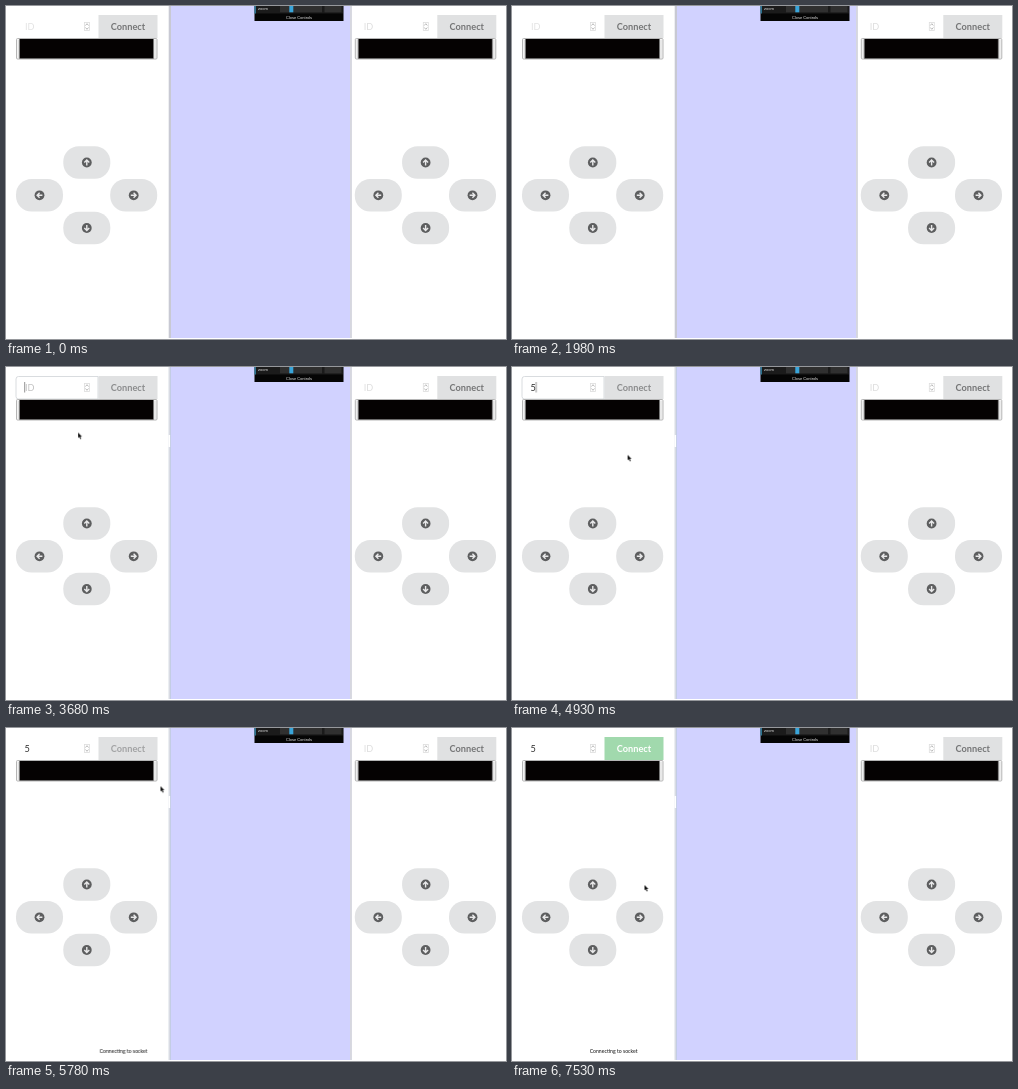
Write an HTML page that moves like this. It is 500 px wide and 333 px high and loops after 8 s.

```html
<!DOCTYPE html>
<html lang="en">
<head>
<meta charset="utf-8">
<title>Controller</title>
<style>
html, body { margin: 0; width: 100%; height: 100%; overflow: hidden; background: #fff; }
svg { display: block; width: 500px; height: 333px; }
text { font-family: Lato, sans-serif; }
.label { font-size: 9.2px; font-weight: 700; fill: #747576; text-anchor: middle; }
.field { font-size: 9.2px; fill: #dedede; }
.panel { font: 4px "Liberation Sans", Arial, sans-serif; fill: #eee; }
.toast { font-size: 5.15px; fill: #111; }
.key { fill: #e2e3e4; }

/* one loop is 8 s: 1% = 80 ms */
.anim { animation: 8s linear infinite; }
.hard { animation-timing-function: step-end; }
#cursor { animation-name: cursor; }
#focus { animation-name: focus; }
#hint { animation-name: hint; }
#value { animation-name: value; }
#caret { animation-name: caret; }
#edge { animation-name: edge; }
#button { animation-name: button; }
#buttonText { animation-name: button-text; }
#toast { animation-name: toast; }

@keyframes cursor {
  0%, 14.1% { transform: translate(-9px, 132px); }
  16% { transform: translate(35px, 121px); }
  17.9%, 20.9% { transform: translate(72px, 110px); }
  22.8% { transform: translate(38px, 140px); }
  24.7% { transform: translate(-9px, 180px); }
  24.75%, 30.2% { transform: translate(-9px, 187px); }
  33% { transform: translate(70px, 148px); }
  35.5% { transform: translate(147px, 92px); }
  38% { transform: translate(112px, 55px); }
  40.4% { transform: translate(72px, 32px); }
  42%, 43.2% { transform: translate(50px, 21px); }
  46% { transform: translate(72px, 65.5px); }
  48.5% { transform: translate(88px, 82px); }
  51%, 60.8% { transform: translate(105.5px, 95.5px); }
  61.6% { transform: translate(115.5px, 88.5px); }
  65% { transform: translate(126px, 30px); }
  66%, 68.5% { transform: translate(128px, 22px); }
  71% { transform: translate(150px, 46px); }
  72.25% { transform: translate(154.5px, 58px); }
  74.5% { transform: translate(145px, 88px); }
  76.6%, 80.4% { transform: translate(134.5px, 110px); }
  85% { transform: translate(131px, 126px); }
  90.4% { transform: translate(132px, 152px); }
  94.1%, 100% { transform: translate(132.5px, 157px); }
}
@keyframes focus { 0% { opacity: 0; } 43% { opacity: 1; } 67.5%, 100% { opacity: 0; } }
@keyframes hint { 0% { fill: #e3e3e3; } 43% { fill: #c2c2c2; } 54%, 100% { fill: transparent; } }
@keyframes value { 0% { opacity: 0; } 54%, 100% { opacity: 1; } }
@keyframes caret {
  0% { opacity: 0; }
  43% { opacity: 1; transform: none; }
  54% { opacity: 1; transform: translateX(5.5px); }
  67.5%, 100% { opacity: 0; }
}
@keyframes edge { 0% { opacity: 0; } 43%, 100% { opacity: 1; } }
@keyframes button { 0%, 73% { fill: #e0e1e2; } 75%, 100% { fill: #a1d9ad; } }
@keyframes button-text {
  0%, 43% { fill: #747576; }
  44%, 67% { fill: #8b8c8d; }
  68%, 73% { fill: #a2a3a4; }
  75%, 100% { fill: #fff; }
}
@keyframes toast {
  0%, 70.5% { transform: translateX(90px); }
  72.25% { transform: translateX(16px); }
  73.5% { transform: translateX(-13px); }
  75% { transform: translateX(4px); }
  76% { transform: translateX(-2px); }
  76.6%, 100% { transform: none; }
}
</style>
</head>
<body>
<svg viewBox="0 0 500 333">
  <defs>
    <g id="key">
      <rect class="key" x="-23.5" y="-16.3" width="47" height="32.6" rx="15.5"/>
      <circle r="4.9" fill="#5d5e5f"/>
      <path d="M0 2.9V-2M-2.5 .1L0-2.4L2.5 .1" fill="none" stroke="#e9e9ea" stroke-width="1.4"/>
    </g>
    <g id="arrow">
      <circle r="4.9" fill="#5d5e5f"/>
      <path d="M0 2.9V-2M-2.5 .1L0-2.4L2.5 .1" fill="none" stroke="#e9e9ea" stroke-width="1.4"/>
    </g>
    <g id="pill">
      <rect class="key" x="-23.5" y="-16.3" width="47" height="32.6" rx="15.5"/>
    </g>
    <g id="pad">
      <rect x="10.5" y="32.5" width="140.5" height="20.5" rx="1" fill="#f4f4f4" stroke="#b5b5b5"/>
      <path d="M12.5 34V52M149 34V52" stroke="#ddd"/>
      <rect x="13.5" y="33" width="134" height="19.5" fill="#050202"/>
      <path d="M13.5 33V52.5M147.5 33V52.5" stroke="#777" stroke-width=".7"/>
      <g fill="none" stroke="#a8a8a8" stroke-width=".8">
        <rect x="78.5" y="16.5" width="5" height="8" stroke="#ddd"/>
        <path d="M79.5 19.5L81 17.7L82.5 19.5M79.5 21.5L81 23.3L82.5 21.5"/>
      </g>
      <use href="#key" x="80.8" y="156.5"/>
      <use href="#pill" x="33.5" y="189.3"/>
      <use href="#arrow" transform="translate(33.5 189.3) rotate(-90)"/>
      <use href="#pill" x="127.7" y="189.3"/>
      <use href="#arrow" transform="translate(127.7 189.3) rotate(90)"/>
      <use href="#pill" x="80.8" y="222"/>
      <use href="#arrow" transform="translate(80.8 222) rotate(180)"/>
    </g>
    <clipPath id="screen"><rect width="163" height="333"/></clipPath>
  </defs>

  <rect width="500" height="333" fill="#fff"/>

  <!-- viewer -->
  <rect x="162.7" width="183" height="332" fill="#c8c9d3"/>
  <rect x="165" width="179" height="332" fill="#d1d2ff"/>
  <path d="M344.7 0V332" stroke="#d9dae2"/>
  <g id="edge" class="anim hard">
    <path d="M163 0V332" stroke="#e9edf3"/>
    <path d="M164.5 0V332" stroke="#c3cde4"/>
    <path d="M163.3 68V80" stroke="#fff" stroke-width="1.6"/>
  </g>
  <rect x="248.5" width="89" height="15" fill="#050505"/>
  <rect x="249" width="88" height="7.5" fill="#1b1b1b"/>
  <rect x="248.5" width="1.4" height="7.5" fill="#2f7f9f"/>
  <rect x="274" width="42" height="6.3" fill="#303030"/>
  <rect x="283.3" width="4" height="6.3" fill="#39a5da"/>
  <rect x="318.5" width="17" height="6.3" fill="#303030"/>
  <text class="panel" x="252" y="4.2">zoom</text>
  <text class="panel" x="293" y="13" text-anchor="middle">Close Controls</text>

  <!-- left controller -->
  <rect id="button" class="anim" x="92.5" y="9" width="59" height="23" fill="#e0e1e2"/>
  <text id="buttonText" class="label anim" x="122" y="23.6">Connect</text>
  <path id="focus" class="anim hard" d="M92 9.5H12.5Q10 9.5 10 12V29.5Q10 32 12.5 32H92Z" fill="#fff" stroke="#d5d9dc" stroke-width=".9"/>
  <use href="#pad"/>
  <text id="hint" class="field anim hard" x="19" y="23.6">ID</text>
  <text id="value" class="field anim hard" x="18.4" y="23.6" style="fill:#333">5</text>
  <path id="caret" class="anim hard" d="M18.7 15V25.5" stroke="#777" stroke-width=".8"/>
  <g clip-path="url(#screen)">
    <text id="toast" class="toast anim" x="77.7" y="325">Connecting to socket</text>
  </g>

  <!-- right controller -->
  <g transform="translate(338.8)">
    <rect x="92.5" y="9" width="59" height="23" fill="#e0e1e2"/>
    <text class="label" x="122" y="23.6">Connect</text>
    <use href="#pad"/>
    <text class="field" x="19" y="23.6">ID</text>
  </g>

  <path id="cursor" class="anim" d="M0 0V5.2L1.2 4.2L2.2 6.4L3.2 5.9L2.2 3.9H3.9Z" fill="#111" stroke="#fff" stroke-width=".4" paint-order="stroke"/>
</svg>
</body>
</html>
```
